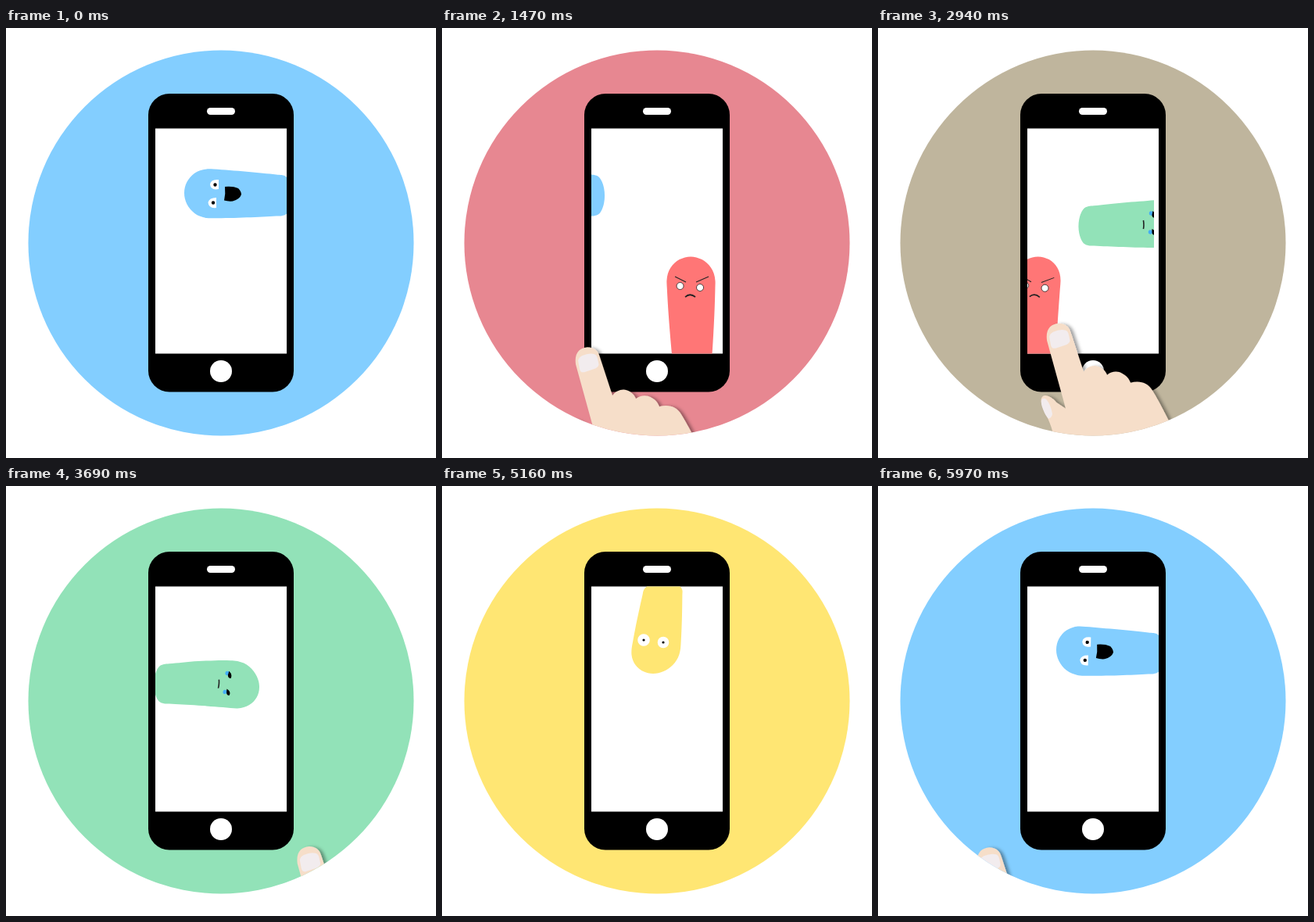
Animation, 550 px wide and 550 px high, one loop 6 s. Source, as an HTML page:

```html
<!DOCTYPE html>
<html lang="en">
<head>
<meta charset="utf-8">
<title>Swiping characters</title>
<style>
html, body { margin: 0; width: 100%; height: 100%; overflow: hidden; background: #fff; }
svg { display: block; width: 100vw; height: 100vh; }
</style>
</head>
<body>
<svg viewBox="0 0 550 550">
  <defs>
    <clipPath id="disc"><circle cx="275" cy="275" r="246.5"/></clipPath>
    <clipPath id="screen"><rect x="191" y="128.500" width="168" height="288"/></clipPath>
    <clipPath id="narrow"><rect x="191" y="128.500" width="162" height="288"/></clipPath>
    <filter id="shadow" x="-20%" y="-20%" width="150%" height="150%">
      <feDropShadow dx="4" dy="1" stdDeviation="2" flood-color="#000" flood-opacity=".38"/>
    </filter>
  </defs>

  <circle id="back" cx="275" cy="275" r="246.5"/>
  <rect x="182" y="84" width="186" height="381.5" rx="27"/>
  <rect x="191" y="128.500" width="168" height="288" fill="#fff"/>
  <rect x="257" y="102" width="36" height="9" rx="4.5" fill="#fff"/>
  <circle cx="275" cy="439" r="14" fill="#fff"/>

  <g clip-path="url(#screen)">
    <g id="blue">
      <path class="body"/>
      <g class="face">
        <path d="M272 194V206Q262 208 261 200Q262 193 272 194ZM269 217V230Q259 231 258.500 223Q260 217 269 217Z" fill="#fff"/>
        <circle cx="267.500" cy="200.500" r="2.200"/>
        <circle cx="265" cy="223.500" r="2.200"/>
        <path d="M280 203Q290 202 297 205Q301 209 301 213Q299 219 290 221.500Q284 222 279 220.500Q281 212 280 203Z"/>
      </g>
    </g>
    <g id="red">
      <path class="body"/>
      <g class="face" fill="none" stroke="#222">
        <circle cx="294.500" cy="330" r="4.500" fill="#fff" stroke-width=".8"/>
        <circle cx="320" cy="332" r="4.500" fill="#fff" stroke-width=".8"/>
        <path d="M288 318L302 325M331 318L315 325" stroke-width="1"/>
        <path d="M301 344Q307 338.500 314 344" stroke-width="1.700"/>
      </g>
    </g>
    <g clip-path="url(#narrow)">
      <g id="green">
        <path class="body"/>
        <g class="face">
          <circle cx="282" cy="237" r="2.700" fill="#45aef5"/>
          <circle cx="281" cy="261" r="2.700" fill="#45aef5"/>
          <path d="M284 234Q289 238 287 243Q283 243 283 239ZM283 257Q289 260 287 265Q283 265 283 261Z"/>
          <path d="M272 246Q273 252 272 257" fill="none" stroke="#222" stroke-width="1.600"/>
        </g>
      </g>
    </g>
    <g id="yellow">
      <path class="body"/>
      <g class="face">
        <circle cx="258" cy="197" r="7.800" fill="#fff"/>
        <circle cx="283" cy="200" r="7.300" fill="#fff"/>
        <circle cx="258" cy="197" r="1.600"/>
        <circle cx="283" cy="200" r="1.600"/>
      </g>
    </g>
  </g>

  <g clip-path="url(#disc)">
    <g id="hand" filter="url(#shadow)">
      <path fill="#f6dec9" d="M-15 21C-17 6-10 0 0-1C9-1 14 4 16 12L32 61C36 55 44 52 50 54C56 56 60 60 62 65C68 60 76 60 81 63C87 66 90 70 92 75C104 72 114 75 120 85C125 93 131 104 137 116L180 200L-1 190L-5 156C-6 140-10 128-16 116C-22 104-25 96-20 92C-15 90-8 94-3 100L9 108Z"/>
      <path fill="#f2ecee" d="M-12 16Q-11 12-7 10Q2 6 9 8Q12 9 13 14L14.500 21Q14 25 8 27L-4 31Q-9 32-10 27ZM-22 97Q-20 94-16 96Q-10 103-8 115Q-9 120-13 121Q-17 117-20 109Q-23 102-22 97Z"/>
    </g>
  </g>
</svg>
<script>
const LOOP = 6000;
const SWIPE = 220;
const swipes = [1294, 2812, 4318, 5748];
const BASE_CAP = 12, HEAD_CAP = 33, STEPS = 20;

// Bodies run along an axis (0 = x, 1 = y) from base to tip; mid and half give centre line and half width.
const characters = [
  { id: "blue", color: [131, 206, 255], axis: 0, base: 366, tip: 228, mid: [214.5, 211], half: [25, 32],
    face: [268, 212], enter: 168, leave: 168, sway: { mean: 0, size: 6, start: 0, period: 700, decay: 700 } },
  { id: "red", color: [255, 118, 118], axis: 1, base: 440, tip: 292.5, mid: [310, 308], half: [24, 31.5],
    face: [307, 332], enter: 168, leave: 165, sway: { mean: 0, size: -7, start: 1470, period: 900 } },
  { id: "green", color: [146, 226, 184], axis: 0, base: 189, tip: 324, mid: [253.5, 249.5], half: [24, 31],
    face: [284, 250], enter: 197, leave: 150, sway: { mean: 8.5, size: 8.5, start: 3185, period: 980 } },
  { id: "yellow", color: [255, 230, 115], axis: 1, base: 122, tip: 240, mid: [284, 270], half: [23.5, 32],
    face: [271, 198], enter: 230, leave: 168, sway: { mean: 0, size: 5, start: 5160, period: 900 } }
];

// Key points of the fingertip: [ms from the start of a swipe, x, y]
const fingerPath = [[-720, 404, 492], [-320, 334, 363], [0, 331, 361], [92, 290, 364],
  [128, 232, 378], [176, 187, 408], [222, 143, 462], [330, 60, 610]];

const $ = id => document.getElementById(id);
const clamp = v => Math.min(1, Math.max(0, v));
const smooth = v => v * v * (3 - 2 * v);
const mix = (a, b, k) => a + (b - a) * k;
const roundEnd = v => Math.sqrt(1 - (1 - clamp(v)) ** 2);

for (const c of characters) {
  c.node = $(c.id);
  c.bodyNode = c.node.querySelector(".body");
  c.faceNode = c.node.querySelector(".face");
  c.bodyNode.setAttribute("fill", `rgb(${c.color})`);
}

function closedCurve(points) {
  const n = points.length;
  const at = i => points[(i + n) % n];
  let d = `M${at(0)}`;
  for (let i = 0; i < n; i++) {
    const handle = (j, sign) => [0, 1].map(k => at(j)[k] + sign * (at(j + 1)[k] - at(j - 1)[k]) / 6);
    d += `C${handle(i, 1)} ${handle(i + 1, -1)} ${at(i + 1)}`;
  }
  return d + "Z";
}

function bodyPath(c, bend) {
  const length = Math.abs(c.tip - c.base);
  const points = [];
  for (let i = 0; i < 2 * STEPS; i++) {
    const angle = Math.PI * i / STEPS;
    const u = (1 - Math.cos(angle)) / 2;
    const half = mix(...c.half, Math.sin(u * Math.PI / 2))
      * roundEnd(u * length / BASE_CAP) * roundEnd((1 - u) * length / HEAD_CAP);
    const along = mix(c.base, c.tip, u);
    const across = mix(...c.mid, u) + bend * u ** 3 + (i < STEPS ? half : -half);
    points.push(c.axis ? [across, along] : [along, across]);
  }
  return closedCurve(points);
}

function drawCharacter(c, t, dx) {
  const { mean, size, start, period, decay } = c.sway;
  const fade = decay ? Math.exp(-t / decay) : 1;
  const bend = mean + size * fade * Math.sin(2 * Math.PI * (t - start) / period);
  const reach = (c.face[c.axis] - c.base) / (c.tip - c.base);
  const slope = 3 * bend * reach ** 2 / (c.tip - c.base);
  const angle = Math.atan(slope) * 180 / Math.PI * (c.axis ? -1 : 1);
  const offset = bend * reach ** 3;
  c.node.style.display = "";
  c.node.setAttribute("transform", `translate(${dx} 0)`);
  c.bodyNode.setAttribute("d", bodyPath(c, bend));
  c.faceNode.setAttribute("transform",
    `translate(${c.axis ? [offset, 0] : [0, offset]}) rotate(${angle} ${c.face[0]} ${c.face[1]})`);
}

function drawHand(ms) {
  const next = fingerPath.findIndex(k => k[0] > ms);
  const visible = next > 0;
  $("hand").style.display = visible ? "" : "none";
  if (!visible) return;
  const a = fingerPath[next - 1], b = fingerPath[next];
  const k = (ms - a[0]) / (b[0] - a[0]);
  $("hand").setAttribute("transform", `translate(${mix(a[1], b[1], k)} ${mix(a[2], b[2], k)})`);
}

function render(t) {
  const passed = swipes.filter(s => s <= t).length;
  const index = (passed + 3) % 4;
  const since = passed ? t - swipes[index] : t + LOOP - swipes[3];
  const progress = clamp(since / SWIPE);
  const slide = smooth(clamp(progress * 1.12 - 0.05));
  const from = characters[index];
  const to = characters[(index + 1) % 4];

  $("back").setAttribute("fill", `rgb(${from.color.map((v, i) => Math.round(mix(v, to.color[i], progress)))})`);
  characters.forEach(c => { c.node.style.display = "none"; });
  if (slide < 1) drawCharacter(from, t, -from.leave * slide);
  drawCharacter(to, passed === 4 ? t - LOOP : t, to.enter * (1 - slide));

  if (since < 400) drawHand(since);
  else {
    const upcoming = passed % 4;
    const until = t - swipes[upcoming] - (passed === 4 ? LOOP : 0);
    drawHand(upcoming === 3 ? until / 0.8 : until);
  }
}

const begin = performance.now();
function tick() {
  render((performance.now() - begin) % LOOP);
  requestAnimationFrame(tick);
}
tick();
</script>
</body>
</html>
```
